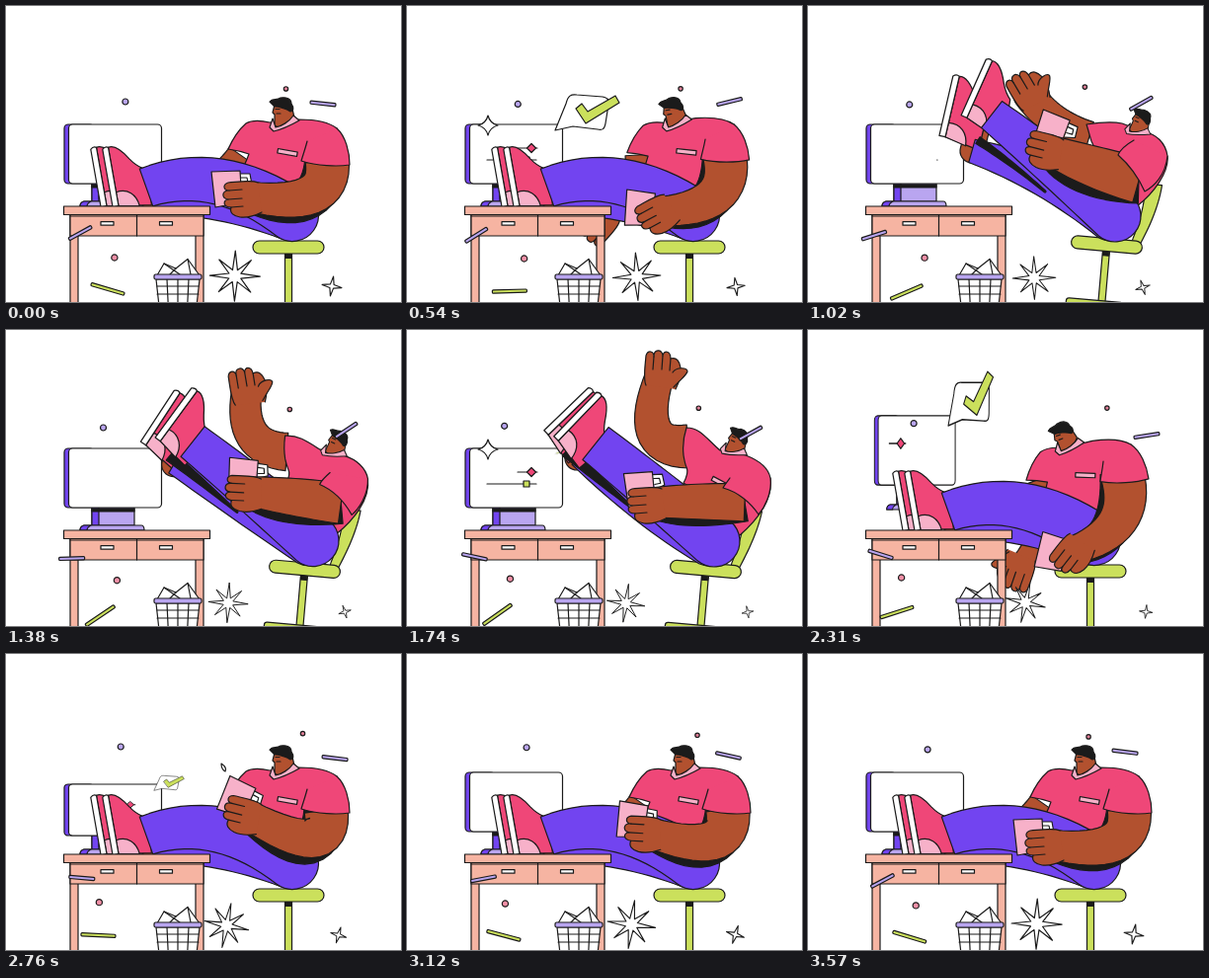
Write an HTML page that moves like this. It is 400 px wide and 300 px high and loops after 3.6 s.

```html
<!DOCTYPE html>
<html lang="en">
<head>
<meta charset="utf-8">
<title>Relaxed at the desk</title>
<style>
html, body { margin: 0; width: 100%; height: 100%; overflow: hidden; background: #fff; }
svg { display: block; width: 400px; height: 300px; }
</style>
</head>
<body>
<svg id="stage" viewBox="0 0 400 300" stroke="#1b1b1b" stroke-width="1.2" stroke-linejoin="round" stroke-linecap="round"></svg>
<script>
const LOOP = 3600;
const INK = '#1b1b1b', PINK = '#ef4778', BLUSH = '#f7b1c9', VIOLET = '#7244f0', LILAC = '#b9a5f0';
const LIME = '#cbe05c', SKIN = '#b2512f', WOOD = '#f6b4a2', WHITE = '#fff';
const stage = document.getElementById('stage');

function el(tag, attrs, parent = stage) {
  const node = document.createElementNS('http://www.w3.org/2000/svg', tag);
  for (const k in attrs) node.setAttribute(k, attrs[k]);
  parent.appendChild(node);
  return node;
}
const group = parent => el('g', {}, parent);
const path = (d, fill, parent) => el('path', { d, fill }, parent);
const rect = (x, y, width, height, rx, fill, parent) => el('rect', { x, y, width, height, rx, fill }, parent);
const place = (node, x, y, r = 0, sx = 1, sy = sx) =>
  node.setAttribute('transform', `translate(${x} ${y}) rotate(${r}) scale(${sx} ${sy})`);
const lerp = (a, b, p) => a + (b - a) * p;
const rad = a => a * Math.PI / 180;
const step = (t, a, b) => {
  const p = Math.max(0, Math.min(1, (t - a) / (b - a)));
  return p * p * (3 - 2 * p);
};
const pulse = (t, a, b, c, d) => step(t, a, b) - step(t, c, d);

// Share of each pose: sitting, leaning back, cheering, slumping, sipping.
let share = [1, 0, 0, 0, 0];
function setPose(t) {
  const back = pulse(t, 560, 1010, 2050, 2300);
  const cheer = back * step(t, 1100, 1590);
  const slump = pulse(t, 60, 540, 560, 1010) / 2 + pulse(t, 2050, 2300, 2330, 2750);
  const sip = pulse(t, 2330, 2750, 2770, 3400);
  share = [1 - back - slump - sip, back - cheer, cheer, slump, sip];
}
function mix(sit, lean, cheer, slump = sit, sip = sit) {
  const all = [sit, lean, cheer, slump, sip];
  return sit.map((_, i) => all.reduce((sum, p, k) => sum + p[i] * share[k], 0));
}
function morph(node, ...shapes) {
  const lists = shapes.map(s => s.match(/-?[\d.]+/g).map(Number));
  const mixed = mix(...lists);
  let i = 0;
  node.setAttribute('d', shapes[0].replace(/-?[\d.]+/g, () => mixed[i++].toFixed(2)));
}

// Tapered tube along a quadratic curve, with a round far end.
function limb(node, [sx, sy, ex, ey, wx, wy, w1, w2], taper = 1) {
  const one = [], two = [], N = 16;
  for (let i = 0; i <= N; i++) {
    const u = i / N, v = 1 - u;
    const x = v * v * sx + 2 * u * v * ex + u * u * wx, y = v * v * sy + 2 * u * v * ey + u * u * wy;
    const dx = v * (ex - sx) + u * (wx - ex), dy = v * (ey - sy) + u * (wy - ey);
    const h = lerp(w1, w2, u ** taper) / 2 / (Math.hypot(dx, dy) || 1);
    one.push(`${x - dy * h},${y + dx * h}`);
    two.unshift(`${x + dy * h},${y - dx * h}`);
  }
  node.setAttribute('d', `M${one.join('L')}A${w2 / 2},${w2 / 2} 0 0 0 ${two.join('L')}Z`);
}
function star(n, R, r, short = 1) {
  const points = Array.from({ length: 2 * n }, (_, i) => {
    const q = i % 2 ? r : i % 4 ? R * short : R, a = Math.PI * i / n;
    return `${q * Math.sin(a)},${-q * Math.cos(a)}`;
  });
  return `M${points.join('L')}Z`;
}
function makeHand(thumb) {
  const g = group();
  path('M10,-14C4,-17 -8,-15 -20,-14C-26,-12 -25,-6 -19,-6C-27,-6 -27,2 -20,3C-26,4 -25,11 -17,11C-19,17 -14,20 -8,21C0,22 6,20 14,16', SKIN, g);
  path('M-19,-6L-6,-7M-20,3L-6,2M-17,11L-5,10', 'none', g);
  if (thumb) path('M-3,13C-9,17 -8,28 -4,28C0,27 3,22 12,14', SKIN, g);
  return g;
}
function makeShoe() {
  const g = group();
  path('M3,-60C10,-62 17,-53 22,-45C26,-39 29,-36 34,-33C38,-22 38,-8 36,5L3,0Z', PINK, g);
  path('M3,-14C15,-16 23,-8 24,4L3,0Z', BLUSH, g);
  path('M-3,-59Q0,-62 3,-60L3,0L-3,0Z', WHITE, g);
  return g;
}

// Monitor
const stand = group();
path('M87,180H130V198H87Z', LILAC, stand);
path('M87,180H94V198H87Z', VIOLET, stand);
path('M87,181H130V184H87Z', INK, stand);
path('M79,198H137Q140,198 140,203H75Q75,199 79,198Z', LILAC, stand);
path('M79,198H86Q82,200 82,203H75Q75,199 79,198Z', VIOLET, stand);
const screen = group();
rect(-49, -30, 30, 60, 4, VIOLET, screen);
rect(-44.5, -30, 94, 60, 4, WHITE, screen);
const line1 = path('', 'none', screen), line2 = path('', 'none', screen);
const diamond = path(star(2, 4.5, 4.5), PINK, screen);
const square = rect(-3, -3, 6, 6, 0, LIME, screen);
const sparkle = path('M0,-10Q2,-2 10,0Q2,2 0,10Q-2,2 -10,0Q-2,-2 0,-10Z', WHITE, screen);

const bubble = group();
path('M0,0L11,-27C13,-35 16,-37 22,-36L48,-34C54,-33 55,-30 54,-26L51,-7C50,-1 48,0 43,-1L18,-4Z', WHITE, bubble);
const tick = path('M-14,-1L-8,-6L-2,2L26,-14L30,-7L-4,14Z', LIME, bubble);

// Chair
const backrest = path('', LIME);
const chair = group();
rect(-3.5, 5, 7, 60, 0, LIME, chair);
rect(-3, 6, 6, 5, 0, INK, chair);
rect(-36, 57, 58, 8, 3, LIME, chair);
rect(-36, -6.5, 72, 13, 6.5, LIME, chair);

// Person
const farArm = path('', SKIN), farHand = makeHand(true);
const body = group(), torso = path('', PINK, body);
const pocket = rect(-10, -2.2, 20, 4.4, 0, BLUSH, body);
const farAnkle = path('', SKIN), farShoe = makeShoe(), farLeg = path('', VIOLET);
const gap = path('', INK);
const nearAnkle = path('', SKIN), nearShoe = makeShoe(), nearLeg = path('', VIOLET);
const bust = group(), head = group(bust);
path('M-10,-19L-12,-11L-10,-9L-10,2C-4,7 6,0 10,-6L7,-19Z', SKIN, head);
path('M-15,-22C-12,-26 -8,-23 -4,-26C2,-27 7,-25 7,-20C10,-16 9,-12 6,-12C2,-15 -6,-17 -10,-17Z', INK, head);
path('M-9,-14.5H-5M-8,-10H-4', 'none', head);
path('M-12,-5L-15,4L-11,8C-2,6 8,1 15,-3L9,-8C5,-2 -3,3 -9,4Z', BLUSH, bust);
const cup = group();
path('M13,-15L23,-15L25,-4L15,0M14,-11L20,-11L21,-6L15,-5', WHITE, cup);
path('M-16,-17L13,-18L15,14L-12,19Z', BLUSH, cup);
const shade = path('', INK), nearArm = path('', SKIN), nearHand = makeHand();
const sleeves = group(), sleeve = path('', PINK, sleeves);
const drop = path('M-2,-4Q4,0 2,4Q-2,2 -2,-4Z', WHITE);

// Desk
for (const x of [65, 192]) rect(x, 211, 8, 95, 0, WOOD);
rect(65, 211, 135, 22, 0, WOOD);
path('M132.5,212V233M65,213H200', 'none');
for (const x of [96, 155.5]) rect(x, 218.7, 13, 3.5, 0, WHITE);
rect(58.5, 203, 148, 8.5, 0, WOOD);

// Basket
path('M153,273L160,261L172,266L184,256.5L196,273Z', WHITE);
path('M160,261L176,272M172,266L166,272M184,256.5L187,272', 'none');
path('M152,277H196L193,304H155Z', WHITE);
for (const x of [163, 174, 185]) path(`M${x},277L${lerp(x, 174, .1)},300`, 'none');
for (const y of [284, 292]) path(`M153,${y}H195`, 'none');
rect(150, 272, 48, 5, 1.5, LILAC);

// Floating bits: each of x, y and turn is [middle, swing, phase]; the last is the size swing.
const stick = (w, fill) => rect(-w / 2, -1.6, w, 3.2, 1, fill);
const dot = (r, fill) => el('circle', { r, fill });
const still = [0, 0, 0];
const bits = [
  [dot(3, LILAC), [110, 12, 25], [97, 3, -90], still, 0],
  [dot(3.1, '#f08fa6'), [106.5, 13, -75], [253.5, 2.5, -53], still, 0],
  [dot(2.2, '#e07f98'), [290, 13, 120], [81.5, 2.7, -25], still, 0],
  [stick(26, LILAC), [334.5, 13.5, 180], [102, 5, 127], [-10.5, 23, 43], 0],
  [stick(26, LILAC), [72, 5.5, 55], [229.8, 2.9, -85], [-7.5, 26, 145], 0],
  [stick(35, LIME), [97, 7.3, -35], [287.5, 2.5, -105], [-9, 27, 20], 0],
  [path(star(8, 25.5, 6.5, .9), WHITE), [226.5, 6.5, -35], [275.3, 1.7, 180], [5, 8, 120], .12],
  [path(star(4, 10, 2.6), WHITE), [337.5, 7.5, 180], [285, 1, 180], [0, 18, 60], .2]
];

function drawScreen(t) {
  const hop = pulse(t, 2100, 2310, 2380, 2660), squash = pulse(t, 2620, 2750, 2770, 2920);
  const w = 1 - .17 * hop, h = 1 + .17 * hop - .13 * squash;
  place(screen, 108, 150 - 28 * hop + 8 * squash, 0, w, h);
  place(stand, 16 * hop, -21 * hop, 0, 1 - .15 * hop, 1);

  const first = pulse(t, 330, 480, 800, 950);
  const slide = first + pulse(t, 1560, 1710, 2720, 2860);
  const x = 18 - 35 * hop;
  place(diamond, x, -6, 0, slide);
  line1.setAttribute('d', `M${x - 14 * slide},-6H${x + 6 * slide}`);
  line1.style.display = slide > .01 ? '' : 'none';

  const bar = pulse(t, 330, 500, 820, 1030) + pulse(t, 1560, 1720, 2060, 2270);
  line2.setAttribute('d', `M${23 - 50 * bar},6H23`);
  line2.style.display = bar > .001 ? '' : 'none';
  place(square, 13, 6, 0, bar);
  place(sparkle, -26, -29, 0, first + pulse(t, 1560, 1710, 2060, 2270));

  const size = pulse(t, 300, 500, 780, 940) + pulse(t, 1640, 2300, 2500, 3000);
  place(bubble, 150 - 8 * hop, 126 - 29 * hop + 12 * squash, -6 * hop, size * w, size * h);
  place(tick, 35, -21, -20 * hop);
}

function drawLegs() {
  const leg = (shoe, ankle, tube, foot, points) => {
    const [x, y, r] = foot, a = rad(r), size = 1 + .05 * (share[1] + share[2]);
    place(shoe, x, y, r, size);
    const ax = x + 33 * Math.cos(a) + 14 * Math.sin(a), ay = y + 33 * Math.sin(a) - 14 * Math.cos(a);
    limb(ankle, [ax, ay, ax, ay + 1, points[0], points[1], 24, 24]);
    limb(tube, points);
  };
  leg(farShoe, farAnkle, farLeg, mix([99, 203, -10], [136, 132, 13], [141, 104, 46]),
    mix([150, 195, 215, 190, 286, 213, 34, 48], [166, 147, 240, 168, 307, 213, 24, 50], [172, 130, 240, 184, 306, 214, 16, 50]));
  leg(nearShoe, nearAnkle, nearLeg, mix([111, 203, -10], [158, 112, 24], [151, 110, 44]),
    mix([142, 184, 215, 158, 290, 212, 40, 53], [186, 110, 240, 152, 311, 213, 34, 52], [191, 115, 245, 158, 311, 214, 42, 52]));
  limb(gap, mix([170, 190, 180, 190, 190, 190, 1, 1], [172, 136, 205, 158, 240, 188, 8, 2], [162, 122, 190, 148, 230, 182, 14, 2]));
}

function drawBody() {
  const slump = share[3];
  const tilt = `translate(${-4 * slump} ${-2 * slump}) rotate(${-8 * slump} 290 150)`;
  body.setAttribute('transform', tilt);
  sleeves.setAttribute('transform', tilt);
  morph(torso,
    'M267,118C258,116 250,115 243,119C235,126 229,136 225,145C232,146 240,148 246,150C244,156 242,160 240,164C250,182 270,200 290,210L330,195C342,160 345,140 335,124C325,116 310,115 297,115Z',
    'M318,119C308,117 295,118 282,120C284,126 285,131 287,137C288,139 289,141 290,144C291,146 292,150 290,155C290,165 290,175 300,188L333,203C350,190 366,168 364,152C362,138 352,130 342,128Z',
    'M317,122C303,110 297,99 283,99C280,108 279,118 280,127C281,133 282,137 283,139C285,143 283,150 280,155C290,160 295,170 300,190L337,208C352,195 371,175 368,150C366,140 356,132 343,127Z');
  morph(sleeve,
    'M305,137C303,145 301,150 299,157C315,162 335,163 348,161C348,148 344,132 335,124',
    'M330,136C323,140 316,146 314,151C322,158 333,170 341,188C350,183 362,172 364,152',
    'M327,150C325,153 322,156 320,160C335,164 348,175 356,187C362,180 370,165 368,150');
  place(pocket, ...mix([285, 148.5, 10], [322, 168, 25], [318, 155, 28]));
  place(bust, ...mix([282, 119, 0, 1], [334, 127, 24, .86], [331, 123, 26, .9], [265, 118, -4, 1]));
  place(head, 0, 0, -16 * slump);
}

function drawArms() {
  const far = mix([236, 150, 222, 170, 182, 195, 24, 22, -30], [285, 132, 245, 120, 224, 90, 30, 32, 55],
    [284, 118, 230, 120, 256, 46, 44, 29, 90], [232, 152, 250, 200, 214, 240, 28, 22, -75]);
  limb(farArm, far);
  place(farHand, far[4], far[5], far[8], 1, -1);

  place(cup, ...mix([224, 185, 0], [246, 127, 24], [236, 162, -2], [247, 226, 20], [233, 146, 28]));
  const near = mix([325, 156, 332, 208, 245, 193, 44, 30, 0], [335, 177, 282, 162, 245, 146, 46, 30, 18],
    [342, 175, 292, 173, 248, 175, 38, 30, 0], [318, 146, 334, 202, 269, 223, 44, 28, -48],
    [324, 158, 332, 213, 245, 163, 44, 30, 18]);
  limb(nearArm, near, 1.7);
  place(nearHand, near[4], near[5], near[8]);
  // shadow bulges out under the elbow
  near[2] -= 14;
  near[3] += 13;
  limb(shade, near, 1.7);
}

function draw(t) {
  setPose(t);
  drawScreen(t);
  place(chair, ...mix([286, 244.5, 0], [302.5, 242, 5], [302.5, 242.5, 5]));
  limb(backrest, mix([322, 188, 326, 200, 317, 201, 15, 12], [350, 181, 348, 206, 333, 238, 17, 9], [351, 183, 348, 206, 333, 238, 17, 9]));
  drawLegs();
  drawBody();
  drawArms();
  const spill = pulse(t, 2660, 2750, 2770, 2860);
  place(drop, 220, 130 - 15 * spill, 0, spill);

  const wave = ([mid, swing, phase]) => mid + swing * Math.cos(rad(360 * t / LOOP + phase));
  for (const [node, x, y, turn, swell] of bits)
    place(node, wave(x), wave(y), wave(turn), wave([1 - swell, swell, 0]));
}

const start = performance.now();
function frame() {
  draw((performance.now() - start) % LOOP);
  requestAnimationFrame(frame);
}
draw(0);
requestAnimationFrame(frame);
</script>
</body>
</html>
```
